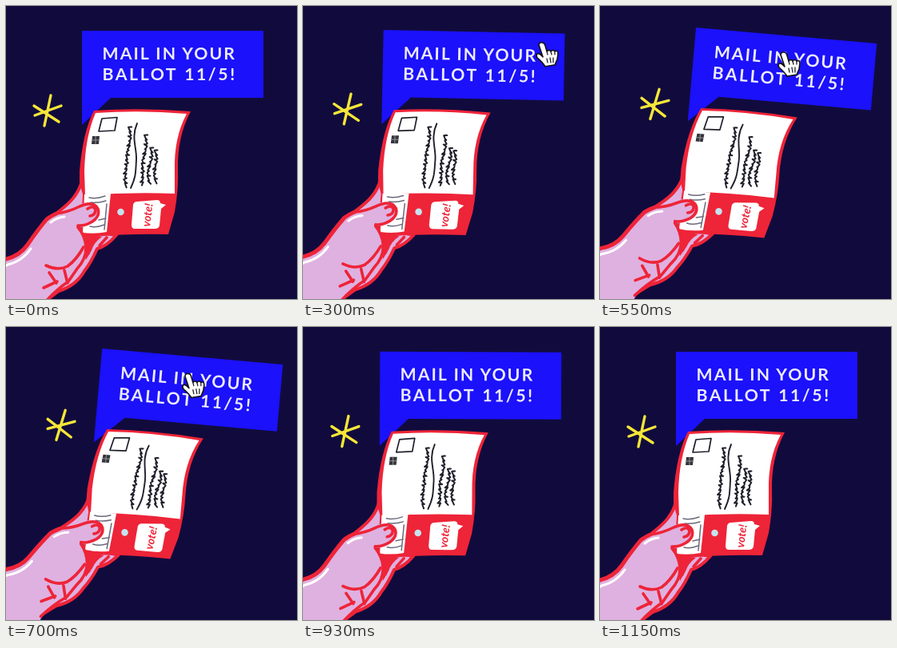
An HTML page that plays this animation: 364x367 px, repeating every 1.35 s.

```html
<!DOCTYPE html>
<html lang="en">
<head>
<meta charset="utf-8">
<title>Mail in your ballot</title>
<style>
  html, body { margin: 0; width: 100%; height: 100%; overflow: hidden; background: #110b3d; }
  svg { display: block; width: 100vw; height: 100vh; }
  path { stroke-linecap: round; stroke-linejoin: round; }
  .label { font: 700 21.3px Lato, sans-serif; letter-spacing: 2px; fill: #ecebff; }
  .wide { letter-spacing: 2.5px; word-spacing: 1px; }
  .vote { font: italic 700 14px Lato, sans-serif; fill: #ee2438; }
  .red { fill: #ee2438; }
  .skin { fill: #dfb1e0; stroke: #ee2438; stroke-width: 4; }
  .crease { fill: none; stroke: #ee2438; stroke-width: 3.6; }
  .edge { stroke-width: 5; }
  .shine { fill: none; stroke: #fff; stroke-width: 3; }
  .ink { fill: none; stroke: #20202c; }
  .print { fill: none; stroke: #6a6a7c; stroke-width: 1.5; }
  .star { fill: none; stroke: #f5e638; stroke-width: 3.4; }
</style>
</head>
<body>
<svg viewBox="0 0 364 367" preserveAspectRatio="none">
  <rect width="364" height="367" fill="#110b3d"/>
  <g id="art">
    <path d="M95 31H322V115H131L95 149Z" fill="#1b11fa"/>
    <text class="label" x="120.5" y="67">MAIL IN YOUR</text>
    <text class="label wide" x="120.5" y="93">BALLOT 11/5!</text>
    <path class="star" d="M56 112L48 150M35 125L66 145M69 125L36 137"/>

    <!-- fingers behind the envelope -->
    <path class="skin" d="M92 280L138 287Q126 301 114 304Q106 322 98 332Q88 350 66 357L46 372L40 320Z"/>
    <path class="red" d="M92 284L120 289Q110 296 107 306L100 318Z"/>
    <path class="skin" d="M60 262Q80 247 86 238Q92 230 95 219L106 236L98 262Z"/>

    <!-- envelope -->
    <path class="red" d="M110 131Q168 127 231 132Q214 164 215 205Q216 229 211 258L203 286Q150 285 112 289L93 286L96 236L92 222V207Q96 158 110 131Z"/>
    <path d="M112 134Q168 130 226 135Q210 165 211 205L211 235Q155 233 99 237L98 207Q99 164 112 134Z" fill="#fff"/>
    <path d="M98 236L131 235L126 283Q112 286 96 284Z" fill="#fff"/>
    <path class="ink" stroke-width="1.7" d="M120 141L139 139.5L136 156L116 157Z"/>
    <path d="M108 163H117L116 173H107Z" fill="#34343d"/>
    <path d="M107 168H117M112 163V173" stroke="#aaa" stroke-width=".8"/>
    <g id="writing"></g>
    <path class="ink" stroke-width="1.9" d="M164 147C156 165 164 178 163 193S163 213 156 228"/>
    <path class="print" d="M104 240Q113 242 124 238M106 246Q116 247 125 244M116 268L125 266M105 276Q113 278 123 274M126 248L123 280"/>
    <circle cx="143.5" cy="258" r="4.3" fill="#c5e3ee"/>
    <path d="M164 245L189 243Q193 243 193 247L200 249L194 254L192 275Q191 279 186 279L161 279Q157 279 157 274L159 249Q160 245 164 245Z" fill="#fff"/>
    <text class="vote" transform="translate(180 277) rotate(-83)">vote!</text>

    <!-- hand -->
    <path d="M-40 346L0 319Q18 315 28 301Q41 281 52 268Q60 261 72 259Q88 248 97 247Q109 245 115 254Q118 263 108 270Q98 277 90 278Q99 288 100 301Q101 316 89 329L78 345Q62 357 50 372L30 410H-40Z" fill="#dfb1e0"/>
    <path class="shine" d="M-10 332L2 324Q20 320 31 304M56 271Q63 265 73 264"/>
    <path class="crease edge" d="M-40 344L0 317Q17 313 27 299Q40 280 51 267Q58 262 63 260"/>
    <path class="crease" d="M63 260Q78 258 90 252Q109 243 115 254Q118 263 108 270Q98 276 90 275M102 254Q109 249 112 255Q112 262 105 263M90 277Q99 288 100 301Q101 316 89 329L78 345Q62 356 48 372"/>
    <path class="crease" d="M50 325Q65 332 77 326Q88 318 97 302M54 334L63 347M73 331L77 347M47 353L64 345M108 292L103 310M126 290L117 300"/>
  </g>

  <g id="arrow">
    <path d="M1 1V28L7.3 22.5L11.5 33L16.3 31L12 21H20Z" fill="#100b30" stroke="#fff" stroke-width="2"/>
  </g>
  <g id="pointer">
    <path d="M-4 3Q-3-1 0 0Q3 0 4 4L6 11Q9 8 11 11Q14 8 16 11Q20 9 20 14L19 21L16 28L4 30Q1 25-6 19Q-8 16-6 14Q-3 13 1 18Z" fill="#fff" stroke="#111" stroke-width="1.6"/>
    <path class="ink" stroke-width="1.3" d="M6 11L7 15M11 11L12 15M16 11V15M6 20L7 25M10 19L11 25M14 19V25"/>
  </g>
</svg>
<script>
const LOOP = 1350;
const TILT = 4.8;
const ENTER = 220, LEAVE = 827;
const PIVOT = "153 315";
const track = [[50, 361, 37], [200, 343, 39], [250, 323, 42], [400, 251, 53.5], [550, 230, 58], [830, 226, 59]];
const byId = id => document.getElementById(id);
const art = byId("art"), arrow = byId("arrow"), pointer = byId("pointer");

// Handwriting: an uneven looping stroke between two points.
function scribble(x1, y1, x2, y2) {
  const n = Math.round((y2 - y1) / 1.6);
  let d = "";
  for (let i = 0; i <= n; i++) {
    const u = i / n;
    const size = 1.7 + 0.9 * Math.sin(i * 0.9);
    const x = x1 + (x2 - x1) * u + size * Math.sin(i * 2) + Math.sin(u * 7);
    const y = y1 + (y2 - y1) * u + 1.4 * Math.cos(i * 1.7);
    d += `${i ? "L" : "M"}${x.toFixed(1)} ${y.toFixed(1)}`;
  }
  return `<path class="ink" stroke-width="2" d="${d}"/>`;
}
byId("writing").innerHTML =
  scribble(155, 150, 149, 226) + scribble(175, 160, 170, 224) +
  scribble(182, 176, 178, 222) + scribble(187, 179, 187, 221);

// Underdamped spring from 0 to 1.
function spring(ms, freq) {
  if (ms <= 0) return 0;
  const z = 0.65, k = Math.sqrt(1 - z * z), a = freq * ms / 1000;
  return 1 - Math.exp(-z * a) * (Math.cos(k * a) + z / k * Math.sin(k * a));
}

function cursorAt(t) {
  const i = Math.max(1, track.findIndex(p => p[0] >= t));
  const a = track[i - 1], b = track[i];
  const u = (t - a[0]) / (b[0] - a[0]);
  return [a[1] + (b[1] - a[1]) * u, a[2] + (b[2] - a[2]) * u];
}

function place(node, shown, pos) {
  node.style.display = shown ? "" : "none";
  if (shown) node.setAttribute("transform", `translate(${pos})`);
}

// The movement is stepped: coarse at first, fine on the way back.
function step(t) {
  return t < 750 ? t - t % 50 : Math.min(1150, 750 + Math.floor((t - 750) / 20) * 20);
}

function draw(t) {
  const angle = t >= 1150 ? 0 : TILT * (spring(t - ENTER, 10.4) - spring(t - LEAVE, 26));
  art.setAttribute("transform", `rotate(${angle.toFixed(3)} ${PIVOT})`);
  const shown = t >= 50 && t < 830;
  const pos = shown && cursorAt(t);
  place(arrow, shown && t < ENTER, pos);
  place(pointer, shown && t >= ENTER, pos);
}

const start = performance.now();
function tick() {
  draw(step((performance.now() - start) % LOOP));
  requestAnimationFrame(tick);
}
tick();
</script>
</body>
</html>
```
